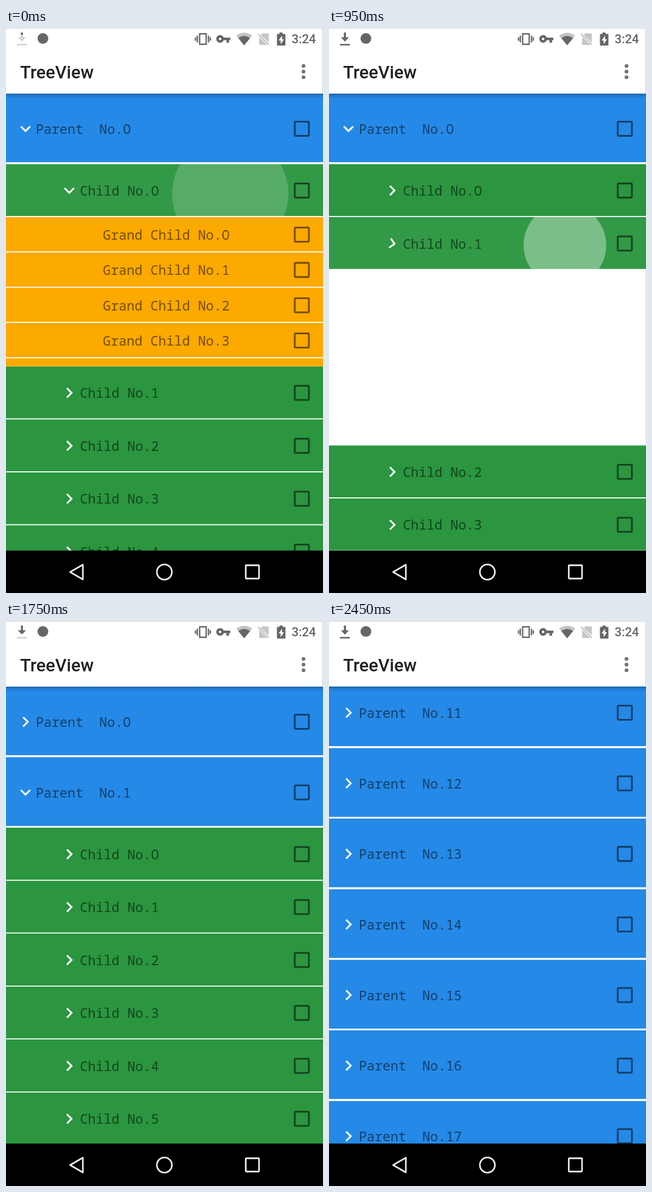
An HTML page for the animation above (2500 ms loop, 561 by 998 pixels).

```html
<!DOCTYPE html>
<html lang="en">
<head>
<meta charset="utf-8">
<title>TreeView</title>
<style>
  html, body { margin: 0; width: 100%; height: 100%; overflow: hidden; background: #fff; }
  svg { display: block; }
  #rows text { font: 23.37px "Noto Sans Mono", monospace; fill: #000; fill-opacity: .54; white-space: pre; }
  .ui { font-family: Roboto, sans-serif; font-weight: 500; }
</style>
</head>
<body>
<svg width="561" height="998" viewBox="0 0 561 998">
  <defs>
    <linearGradient id="shade" x1="0" y1="0" x2="0" y2="1">
      <stop offset="0" stop-opacity=".32"/>
      <stop offset=".4" stop-opacity=".12"/>
      <stop offset="1" stop-opacity="0"/>
    </linearGradient>
    <clipPath id="fill"><rect id="level" x="15" y="0" width="26" height="12"/></clipPath>
    <g id="arrow">
      <path d="M26.4 8h3.6v8.5h5.2L28.2 24l-7-7.5h5.2z"/>
      <rect x="19.5" y="28.2" width="17.5" height="2.6"/>
    </g>
  </defs>
  <rect width="561" height="998" fill="#fff"/>
  <rect x="560" width="1" height="923" fill="#ddd"/>
  <g id="rows"></g>

  <rect y="115.7" width="561" height="9" fill="url(#shade)"/>
  <rect width="561" height="115.7" fill="#fff"/>
  <path d="M0 .5H561M560.5 0V115" stroke="#d0d0d0" fill="none"/>
  <text class="ui" x="25" y="88.5" font-size="31.16" fill="#212121">TreeView</text>
  <g fill="#737373">
    <circle cx="526.5" cy="67" r="3.3"/><circle cx="526.5" cy="77" r="3.3"/><circle cx="526.5" cy="87" r="3.3"/>
  </g>

  <g fill="#666">
    <use href="#arrow" fill="#d2d2d2"/>
    <use href="#arrow" clip-path="url(#fill)"/>
    <circle cx="65.3" cy="18.5" r="9.5"/>
    <path d="M342.7 10.3h11.6v18.4h-11.6zM338.6 13.5v12M335.4 16.5v6M358.4 13.5v12M361.6 16.5v6" fill="none" stroke="#666" stroke-width="2.4"/>
    <path transform="translate(371 5.7) scale(1.13)" d="M12.65 10C11.83 7.67 9.61 6 7 6c-3.31 0-6 2.69-6 6s2.69 6 6 6c2.61 0 4.83-1.67 5.65-4H17v4h4v-4h2v-4H12.65zM7 14c-1.1 0-2-.9-2-2s.9-2 2-2 2 .9 2 2-.9 2-2 2z"/>
    <path d="M421.5 30.5L407.5 13.5Q421.5 3.500 435.500 13.500z" fill="#c2c2c2"/>
    <path d="M421.500 30.500L411 17.700Q421.500 10.500 432 17.700z"/>
    <path d="M454 9.500h9.500q1.500 0 1.500 1.500v14.500L450.500 12.500zM448 15.500L462.500 30h-13q-1.500 0-1.500-1.500z" fill="#c6c6c6"/>
    <path d="M446 10.500L465 29.500" stroke="#bbb" stroke-width="2" fill="none"/>
    <path d="M484 8h5.500v2.500h4.500q.5 0 .5 1V30q0 1-1 1h-13q-1 0-1-1V11.500q0-1 1-1h3.500z"/>
    <path d="M488.500 13.500l-6 8.500h3.500v6.500l6-8.500h-3.500z" fill="#fff"/>
    <text class="ui" x="505.500" y="27.300" font-size="21.800">3:24</text>
  </g>

  <rect y="923" width="561" height="75" fill="#000"/>
  <g fill="none" stroke="#efefef" stroke-width="2.8" stroke-linejoin="round">
    <path d="M113.500 961L136 948V974z"/>
    <circle cx="280.300" cy="961" r="13.300"/>
    <rect x="424.300" y="949" width="23.500" height="23.500" rx="1"/>
  </g>
</svg>

<script>
const LOOP = 2500, STEP = 50;
const TOP = 115.7, BOTTOM = 923;
const FADE = 50, MOVE = 104.2, TURN = 71;

// One entry per depth of the tree.
const LEVELS = [
  { name: "Parent  No.", h: 124.67, sep: 3.1, fill: "#2589e7", icon: 34.5, x: 52.8, count: 30, tint: 0 },
  { name: "Child No.", h: 93.5, sep: 1.56, fill: "#2b953f", icon: 112, x: 130.7, count: 8, tint: .035 },
  { name: "Grand Child No.", h: 62.33, sep: 1.56, fill: "#fca900", x: 171.5, count: 5 }
];

// Taps: time, row, opens or closes, ripple start, touch x, touch y from the row middle, ripple strength.
const TAPS = [
  { at: -77.5, key: "0.0", open: true, rip: -77.4, x: 463, y: 9, a: .444 },
  { at: 202.5, key: "0.0", open: false, rip: 203, x: 453.5, y: 4, a: .635 },
  { at: 565.7, key: "0.1", open: true, rip: 559.4, x: 478, y: 2, a: .6 },
  { at: 895, key: "0.1", open: false, rip: 895, x: 465, y: 4, a: .63 },
  { at: 1275, key: "0", open: false, rip: 1275, x: 455, y: 6, a: .6 },
  { at: 1610, key: "1", open: true, rip: 1610, x: 460, y: 6, a: .5 },
  { at: 1864.7, key: "1", open: false, rip: 1883, x: 451.5, y: 7.7, a: .63 }
];

const rows = document.getElementById("rows");
const level = document.getElementById("level");
const clamp = v => Math.min(1, Math.max(0, v));
const ease = v => (1 - Math.cos(Math.PI * clamp(v))) / 2;

// Visibility of the children, share of their space, and arrow angle.
function fold(key, t) {
  const tap = TAPS.filter(e => e.key === key && e.at <= t).pop();
  if (!tap) {
    const open = key === "0" ? 1 : 0;
    return { alpha: open, space: open, angle: 90 * open };
  }
  const d = t - tap.at, turn = ease(d / TURN);
  return tap.open
    ? { alpha: 1, space: ease(d / MOVE), angle: 90 * turn }
    : { alpha: clamp(1 - d / FADE), space: 1 - ease((d - FADE) / MOVE), angle: 90 * (1 - turn) };
}

function ripple(key, t, L, h) {
  const tap = TAPS.filter(e => e.key === key && e.rip <= t).pop();
  const r = tap ? (t - tap.rip) * 1.33 : 0;
  if (r <= 0 || r >= 170) return "";
  const k = r / 284;
  const cx = tap.x + (280.5 - tap.x) * k, cy = L.h / 2 + tap.y * (1 - k);
  return `<rect width="561" height="${h}" fill="#fff" fill-opacity="${L.tint}"/>
    <circle cx="${cx}" cy="${cy}" r="${r}" fill="#fff" fill-opacity="${tap.a * (1 - r / 170)}"/>`;
}

function row(depth, key, i, y, angle, t) {
  const L = LEVELS[depth], h = L.h - L.sep, mid = y + L.h / 2;
  if (y > BOTTOM || y + L.h < TOP) return "";
  // Round zeros, without a slash.
  const label = L.name + String(i).replace(/0/g, "O");
  const icon = L.icon
    ? `<path transform="translate(${L.icon} ${mid}) rotate(${angle}) scale(1.558)" fill="#fff"
        d="M-2-6L-3.41-4.59 1.17 0-3.41 4.59-2 6 4 0z"/>`
    : "";
  return `<rect y="${y}" width="561" height="${L.h}" fill="#fff"/>
    <svg y="${y}" width="561" height="${h}" overflow="hidden">
      <rect width="561" height="${h}" fill="${L.fill}"/>${ripple(key, t, L, h)}
    </svg>${icon}
    <text x="${L.x}" y="${mid + 8.9}">${label}</text>
    <rect x="511" y="${mid - 12.5}" width="25" height="25" rx="1.5"
      fill="none" stroke="#000" stroke-opacity=".54" stroke-width="3.1"/>`;
}

// Draws a row with its children; returns the markup and where the next row begins.
function branch(depth, key, i, y, t) {
  const state = fold(key, t), kids = LEVELS[depth + 1];
  const below = y + LEVELS[depth].h;
  let out = row(depth, key, i, y, state.angle, t);
  if (!kids || (!state.alpha && !state.space)) return { out, end: below };

  let end = below;
  if (state.alpha) {
    let inner = "";
    for (let j = 0; j < kids.count; j++) {
      const b = branch(depth + 1, key + "." + j, j, end, t);
      inner += b.out;
      end = b.end;
    }
    out += `<g opacity="${state.alpha}">${inner}</g>`;
    if (state.alpha < 1)
      out += `<rect y="${below}" width="561" height="${end - below}" fill-opacity="${.03 * (1 - state.alpha)}"/>`;
  } else {
    end += kids.count * kids.h;
  }
  return { out, end: below + (end - below) * state.space };
}

function scroll(t) {
  const p = clamp((t - 2130) / 400);
  return 1445.2 * (1 - (1 - p) ** 2);
}

function draw(t) {
  let y = TOP - scroll(t), out = "";
  for (let i = 0; i < LEVELS[0].count && y < BOTTOM; i++) {
    const b = branch(0, String(i), i, y, t);
    out += b.out;
    y = b.end;
  }
  rows.innerHTML = out;
  level.setAttribute("height", [12, 14, 17, 22.5, 26, 32][Math.floor(t % 500 / 500 * 6)]);
}

const start = performance.now();
let shown = -1;
function tick() {
  const t = Math.floor((performance.now() - start) % LOOP / STEP) * STEP;
  if (t !== shown) draw(shown = t);
  requestAnimationFrame(tick);
}
tick();
</script>
</body>
</html>
```
